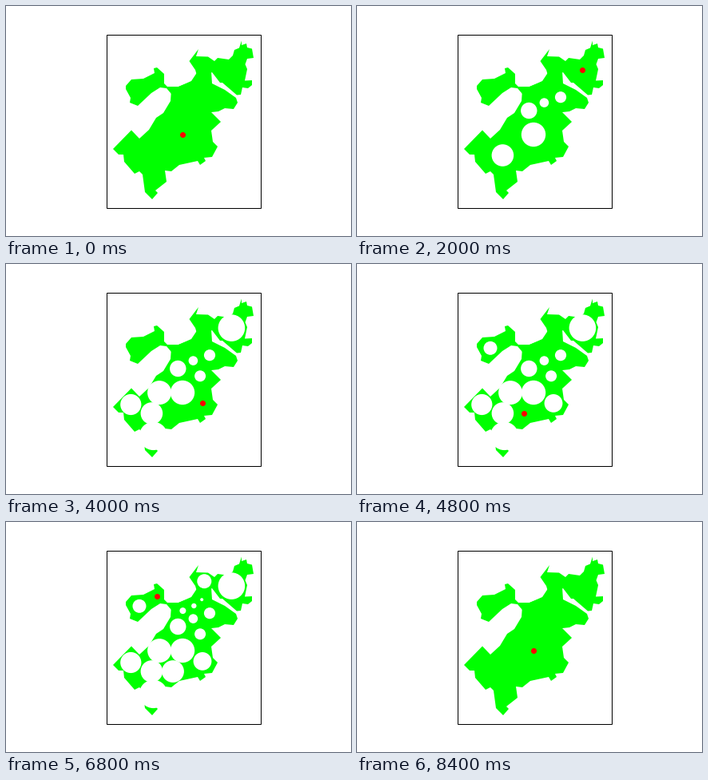
Recreate the animation shown at these times as a matplotlib script. Size 432 px wide and 288 px high, loop 9200 ms.

```python
import matplotlib.pyplot as plt
from matplotlib.animation import FuncAnimation
from matplotlib.patches import Circle, Polygon, Rectangle

W, H, DPI = 432, 288, 72
STEP_MS, STEPS, RESET = 400, 23, 21

# Land in stage pixels, y pointing down, as three overlapping parts
WEST_ARM = [
    (207, 110), (201, 103), (193, 102), (182, 109), (165, 125), (155, 121),
    (156, 115), (150, 104), (150, 100), (157, 92), (172, 91), (186, 84),
    (185, 78), (189, 77), (198, 85), (198, 97), (202, 101), (216, 101),
    (234, 94),
]

NORTH_EAST = [
    (240, 90), (237, 80), (229.5, 69), (241, 54), (238, 63), (253, 63.5),
    (261, 69), (265, 65), (279, 67), (284, 62), (286, 55), (292, 52.5),
    (295, 43.5), (295, 49), (301, 47), (302, 52), (308, 53.5), (310, 65),
    (302, 66), (299.5, 73), (302, 79), (299, 93.5), (308, 93), (308, 99),
    (303, 103), (296, 102), (294, 111), (289, 111.5), (271, 96), (268, 96),
    (258, 83),
]

BODY = [
    (134, 179), (157, 155.5), (167, 166), (179, 155), (188, 140),
    (197, 134), (206, 119), (207, 105), (232, 94), (239, 83.5), (257, 82),
    (258, 97), (274, 105), (288, 115), (290, 121), (285, 129), (274, 128),
    (266, 132), (257, 133), (269, 145), (257, 156), (259, 170), (265, 176),
    (258, 189), (248, 190), (250, 194), (243, 199), (240, 194), (217, 199),
    (207, 207), (199, 206), (201, 220), (187, 231), (190, 234), (183, 242),
    (174, 233), (171, 211), (167, 207), (161, 210), (148, 195), (147, 186),
    (141, 186),
]

# Centre and radius of each cut, in order; the last spot is only marked
SPOTS = [
    (221, 161, 15.2), (182.4, 187, 13.8), (234.4, 121.1, 5.8),
    (255, 114.2, 7.1), (215.3, 131, 10.2), (282.4, 80.1, 16.8),
    (243.1, 140.3, 7), (156.3, 176, 13.1), (192.1, 161.1, 15),
    (184.5, 215.4, 17.7), (246, 174.4, 11.4), (167, 105.3, 8.5),
    (209, 187.1, 13.9), (245.2, 97.2, 2), (221.4, 111.1, 4),
    (235.3, 105, 3.2), (248.3, 74.2, 9), (189, 93.3, 9.5),
    (272.3, 118.3, 10.4), (249.5, 155.5, 0),
]

fig = plt.figure(figsize=(W / DPI, H / DPI), dpi=DPI, facecolor="white")
ax = fig.add_axes([0, 0, 1, 1])
ax.set_xlim(0, W)
ax.set_ylim(H, 0)
ax.axis("off")

for part in (WEST_ARM, NORTH_EAST, BODY):
    ax.add_patch(Polygon(part, facecolor="lime", edgecolor="none"))

cuts = [
    ax.add_patch(Circle((x, y), r, facecolor="white", edgecolor="none"))
    for x, y, r in SPOTS[:-1]
]
ax.add_patch(Rectangle((125.5, 35.5), 193, 217, fill=False,
                       edgecolor="black", linewidth=1))
dot, = ax.plot([], [], "o", color="red", markersize=6)


def draw(step):
    done = 0 if step >= RESET else min(step, len(cuts))
    for i, cut in enumerate(cuts):
        cut.set_visible(i < done)
    x, y, _ = SPOTS[done]
    dot.set_data([x], [y])
    return [*cuts, dot]


anim = FuncAnimation(fig, draw, frames=STEPS, init_func=lambda: draw(0),
                     interval=STEP_MS, repeat=True, repeat_delay=0)
plt.show()
```
